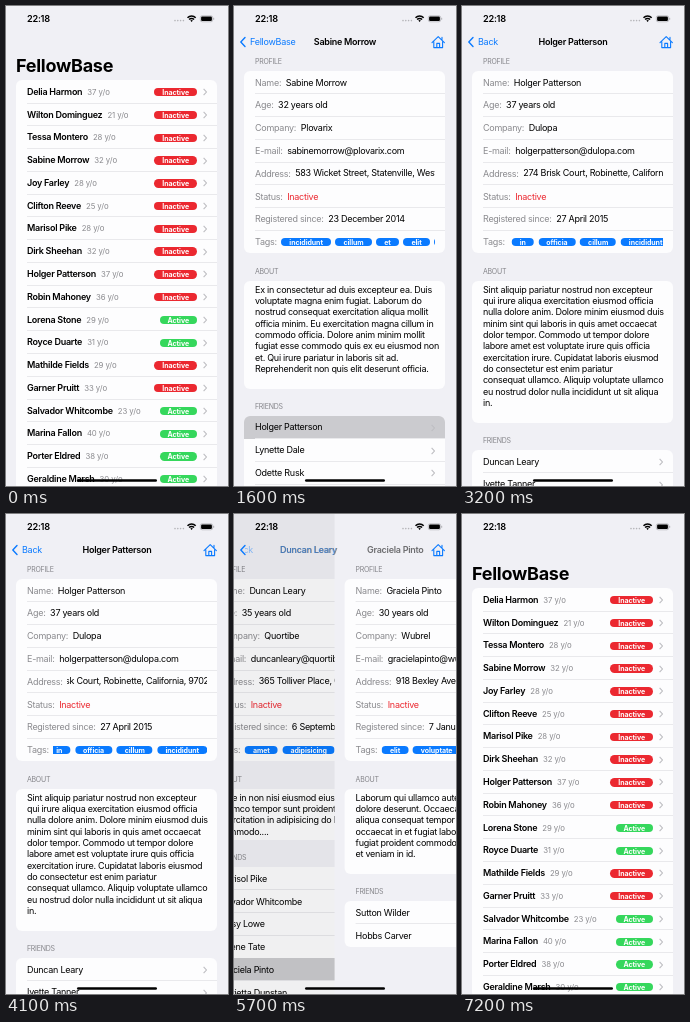
These frames come from a looping animation (222 px wide and 480 px high, 7.3 s). An HTML page:

```html
<!DOCTYPE html>
<html lang="en">
<head>
<meta charset="utf-8">
<title>Friends app</title>
<style>
  html, body { margin: 0; width: 100%; height: 100%; overflow: hidden; background: #f0f0f5; }
  #stage {
    position: relative; width: 222px; height: 480px; overflow: hidden;
    font: 9px/22.78px Inter, sans-serif; letter-spacing: -.03em; white-space: nowrap; color: #000;
  }
  .page { position: absolute; inset: 0; background: #f0f0f5; }
  .detail { padding-top: 37.8px; height: 442.2px; overflow: hidden; }
  .dim { position: absolute; inset: 0; background: #000; opacity: 0; }
  .large { position: absolute; left: 10px; top: 49px; font-size: 18px; font-weight: 700; }
  .card { margin: 0 11px 0 10px; background: #fdfdfe; border-radius: 6px; overflow: hidden; }
  .list { margin-top: 74.4px; }
  .head { padding: 9.6px 0 0 21px; font-size: 7px; line-height: 17.8px; color: #85858a; }
  .row {
    position: relative; display: flex; align-items: center; box-sizing: border-box;
    height: 22.78px; padding: 1px 10px 0 11px;
  }
  .row:not(:last-child)::after {
    content: ""; position: absolute; left: 11px; right: 0; bottom: 0; height: .6px; background: #e9e9ec;
  }
  .row.pressed { background: #cbcbcf; }
  .row b, .title { font-weight: 600; }
  .label { color: #8a8a8e; margin-right: 4.6px; }
  .age { color: #8a8a8e; font-size: 7.8px; letter-spacing: -.01em; margin-left: 5px; }
  .arrow { width: 4px; height: 8px; margin-left: 6px; }
  .row .push { margin-left: auto; }
  .pill {
    height: 8.4px; padding: 0 8px; border-radius: 5px; color: #fff;
    font-size: 7px; font-weight: 700; line-height: 9.2px; letter-spacing: -.01em;
  }
  .window { flex: 1; min-width: 0; overflow: hidden; }
  .strip { display: inline-flex; align-items: center; gap: 4.6px; height: 22px; vertical-align: top; }
  .about { padding: 2.9px 11px; line-height: 11.35px; white-space: pre; }
  .nav { position: absolute; inset: 0; line-height: 14px; visibility: hidden; clip-path: inset(0 0 0 11px); }
  .nav span { position: absolute; top: 29px; }
  .back { left: 16px; color: #0a7aff; }
  #chrome { position: absolute; left: 0; top: 0; }
</style>
</head>
<body>
<div id="stage"></div>
<script>
const BLUE = '#0a7aff', RED = '#eb2830', GREEN = '#35d75c';
const WIDTH = 222, LOOP = 7300;
const stage = document.getElementById('stage');

const pill = (text, color, cls = '') => `<span class="pill ${cls}" style="background:${color}">${text}</span>`;
const arrow = cls => `<svg class="arrow ${cls}" viewBox="0 0 4 8"><path d="M.6 .8L3.4 4L.6 7.2" fill="none" stroke="#bfbfc3" stroke-width="1.1"/></svg>`;
const row = html => `<div class="row">${html}</div>`;
const field = (label, html) => row(`<span class="label">${label}:</span>${html}`);
const strip = (html, cls) => `<div class="window"><div class="strip ${cls}">${html}</div></div>`;

const members = [
  ['Delia Harmon', 37], ['Wilton Dominguez', 21], ['Tessa Montero', 28], ['Sabine Morrow', 32],
  ['Joy Farley', 28], ['Clifton Reeve', 25], ['Marisol Pike', 28], ['Dirk Sheehan', 32],
  ['Holger Patterson', 37], ['Robin Mahoney', 36], ['Lorena Stone', 29, 1], ['Royce Duarte', 31, 1],
  ['Mathilde Fields', 29], ['Garner Pruitt', 33], ['Salvador Whitcombe', 23, 1],
  ['Marina Fallon', 40, 1], ['Porter Eldred', 38, 1], ['Geraldine Marsh', 30, 1]
];

const profiles = [
  {
    name: 'Sabine Morrow', back: 'FellowBase', age: 32, company: 'Plovarix',
    address: '583 Wicket Street, Statenville, West Virginia, 4823', since: '23 December 2014',
    tags: 'incididunt cillum et elit ex',
    about: `Ex in consectetur ad duis excepteur ea. Duis
voluptate magna enim fugiat. Laborum do
nostrud consequat exercitation aliqua mollit
officia minim. Eu exercitation magna cillum in
commodo officia. Dolore anim minim mollit
fugiat esse commodo quis ex eu eiusmod non
et. Qui irure pariatur in laboris sit ad.
Reprehenderit non quis elit deserunt officia.\n `,
    friends: ['Holger Patterson', 'Lynette Dale', 'Odette Rusk', 'Marisol Pike']
  },
  {
    name: 'Holger Patterson', back: 'Back', age: 37, company: 'Dulopa',
    address: '274 Brisk Court, Robinette, California, 9702', since: '27 April 2015',
    tags: 'ipsum consequat mollit in officia cillum incididunt',
    about: `Sint aliquip pariatur nostrud non excepteur
qui irure aliqua exercitation eiusmod officia
nulla dolore anim. Dolore minim eiusmod duis
minim sint qui laboris in quis amet occaecat
dolor tempor. Commodo ut tempor dolore
labore amet est voluptate irure quis officia
exercitation irure. Cupidatat laboris eiusmod
do consectetur est enim pariatur
consequat ullamco. Aliquip voluptate ullamco
eu nostrud dolor nulla incididunt ut sit aliqua
in.\n `,
    friends: ['Duncan Leary', 'Ivette Tanner']
  },
  {
    name: 'Duncan Leary', back: 'Back', age: 35, company: 'Quortibe',
    address: '365 Tolliver Place, Glenwick, Oregon, 3180', since: '6 September 2015',
    tags: 'amet adipisicing dolor elit',
    about: `Aute in non nisi eiusmod eiusmod aute
ullamco tempor sunt proident. Duis
exercitation in adipisicing do labore
commodo....`,
    friends: ['Marisol Pike', 'Salvador Whitcombe', 'Patsy Lowe', 'Jolene Tate', 'Graciela Pinto', 'Marietta Dunstan']
  },
  {
    name: 'Graciela Pinto', back: 'Duncan Leary', age: 30, company: 'Wubrel',
    address: '918 Bexley Avenue, Marlow, Nevada, 5127', since: '7 January 2014',
    tags: 'elit voluptate minim sint',
    about: `Laborum qui ullamco aute laborum nulla
dolore deserunt. Occaecat irure et
aliqua consequat tempor sint
occaecat in et fugiat laboris velit
fugiat proident commodo sunt quis
et veniam in id.\n `,
    friends: ['Sutton Wilder', 'Hobbs Carver']
  }
];

const listHtml = `<div class="page"><div class="large">FellowBase</div><div class="card list">${
  members.map(([name, age, active]) => row(`<b>${name}</b><span class="age">${age} y/o</span>` +
    pill(active ? 'Active' : 'Inactive', active ? GREEN : RED, 'push') + arrow(''))).join('')
}</div><div class="dim"></div></div>`;

function detailHtml(p) {
  const email = `${p.name.replace(' ', '')}@${p.company}.com`.toLowerCase();
  return `<div class="page detail"><div class="head">PROFILE</div><div class="card">${
    field('Name', p.name) + field('Age', p.age + ' years old') + field('Company', p.company) +
    field('E-mail', email) + field('Address', strip(p.address, 'address')) +
    field('Status', `<span style="color:${RED}">Inactive</span>`) + field('Registered since', p.since) +
    field('Tags', strip(p.tags.split(' ').map(tag => pill(tag, BLUE)).join(''), 'tags'))
  }</div><div class="head">ABOUT</div><div class="card about">${p.about}</div>
  <div class="head">FRIENDS</div><div class="card friends">${
    p.friends.map(name => row(name + arrow('push'))).join('')
  }</div><div class="dim"></div></div>`;
}

const navHtml = p => `<div class="nav"><span class="back">${p.back}</span><span class="title">${p.name}</span></div>`;

const chromeHtml = `<svg id="chrome" width="222" height="480" fill="none">
  <text x="21" y="15.8" font-size="9.2" font-weight="600" fill="#000">22:18</text>
  <g fill="#b4b4b8"><circle cx="169" cy="14.6" r=".8"/><circle cx="171.8" cy="14.6" r=".8"/><circle cx="174.6" cy="14.6" r=".8"/><circle cx="177.4" cy="14.6" r=".8"/></g>
  <g stroke="#000" stroke-width="1.5"><path d="M181.5 11.8a5.7 5.7 0 0 1 8.2 0M183.1 13.6a3.5 3.5 0 0 1 5 0"/></g>
  <path d="M185.6 16l-1.3-1.4a1.9 1.9 0 0 1 2.6 0z" fill="#000"/>
  <rect x="194.3" y="9.8" width="12.4" height="6" rx="1.8" stroke="#a0a0a4" stroke-width=".6"/>
  <rect x="195.1" y="10.6" width="10.8" height="4.4" rx="1.1" fill="#000"/>
  <path d="M207.7 11.9v1.8" stroke="#a0a0a4" stroke-width=".8"/>
  <g id="buttons" stroke="${BLUE}" stroke-linecap="round" stroke-linejoin="round">
    <path d="M11 31.6L6.8 36L11 40.4" stroke-width="1.4"/>
    <path d="M198 36.6L204.2 30.6L210.4 36.6M199.8 35.4V41.6H208.6V35.4M202.8 41.6V37.4H205.6V41.6M208 33.6V31.2" stroke-width="1.1"/>
  </g>
  <rect x="71" y="473.2" width="80" height="2.6" rx="1.3" fill="#000"/>
</svg>`;

stage.innerHTML = listHtml + profiles.map(detailHtml).join('') + profiles.map(navHtml).join('') + chromeHtml;

const pages = [...stage.querySelectorAll('.page')];
const navs = [null, ...stage.querySelectorAll('.nav')];
const large = stage.querySelector('.large');
const buttons = document.getElementById('buttons');

// Each step shows page `to`; a tap first presses a row of page `from`.
const steps = [
  { from: 0, to: 1, row: 3, tap: 250, start: 380 },
  { from: 1, to: 2, row: 0, tap: 1510, start: 1640 },
  { from: 2, to: 3, row: 0, tap: 4850, start: 4960 },
  { from: 3, to: 4, row: 4, tap: 5440, start: 5560 },
  { from: 4, to: 0, start: 6440 }
];
for (const step of steps) {
  if (step.tap) step.element = pages[step.from].querySelectorAll('.list .row, .friends .row')[step.row];
}

function spring(ms) {
  const x = 13 * Math.max(0, ms) / 1000;
  return ms >= 580 ? 1 : 1 - (1 + x) * Math.exp(-x);
}

function easeOut(t, start, duration) {
  const u = Math.min(1, Math.max(0, (t - start) / duration));
  return 1 - (1 - u) ** 3;
}

function place(element, x, opacity) {
  element.style.transform = `translateX(${x}px)`;
  element.style.opacity = opacity;
}

// Shows `upper` sliding over `lower`; p = 1 means fully covered.
function showPages(lower, upper, p) {
  pages.forEach((page, i) => {
    page.style.visibility = (i === lower && p < 1) || (i === upper && p > 0) ? 'visible' : 'hidden';
    if (navs[i]) navs[i].style.visibility = page.style.visibility;
  });
  pages[lower].style.transform = `translateX(${-.3 * WIDTH * p}px)`;
  pages[upper].style.transform = `translateX(${WIDTH * (1 - p)}px)`;
  pages[lower].querySelector('.dim').style.opacity = .09 * p;
  pages[upper].querySelector('.dim').style.opacity = 0;

  const titleLeft = nav => (WIDTH - nav.lastChild.getBoundingClientRect().width) / 2;
  const [under, over] = [navs[lower], navs[upper]];
  let travel = 40;
  if (under) {
    const left = titleLeft(under);
    travel = left - 16;
    place(under.firstChild, -31 * p, 1 - p);
    place(under.lastChild, left - travel * p, 1 - p);
  }
  place(over.firstChild, travel * (1 - p), p);
  place(over.lastChild, titleLeft(over) + WIDTH / 2 * (1 - p), p);
  large.style.opacity = 1 - p;
  buttons.style.opacity = lower === 0 ? p : 1;
}

function scrollStrip(selector, amount) {
  const inner = pages[2].querySelector(selector);
  const distance = inner.getBoundingClientRect().width - inner.parentNode.getBoundingClientRect().width;
  inner.style.transform = `translateX(${-distance * amount}px)`;
}

function draw(t) {
  const step = steps.filter(s => t >= s.start).pop() || steps[0];
  const p = spring(t - step.start);
  if (step.to > step.from) showPages(step.from, step.to, p);
  else showPages(step.to, step.from, 1 - p);

  for (const { element, tap, start } of steps) {
    if (element) element.classList.toggle('pressed', t >= tap && t < start + 580);
  }
  scrollStrip('.tags', easeOut(t, 2700, 800));
  scrollStrip('.address', easeOut(t, 3300, 1300));
}

const begin = performance.now();
function tick() {
  draw((performance.now() - begin) % LOOP);
  requestAnimationFrame(tick);
}
tick();
</script>
</body>
</html>
```
